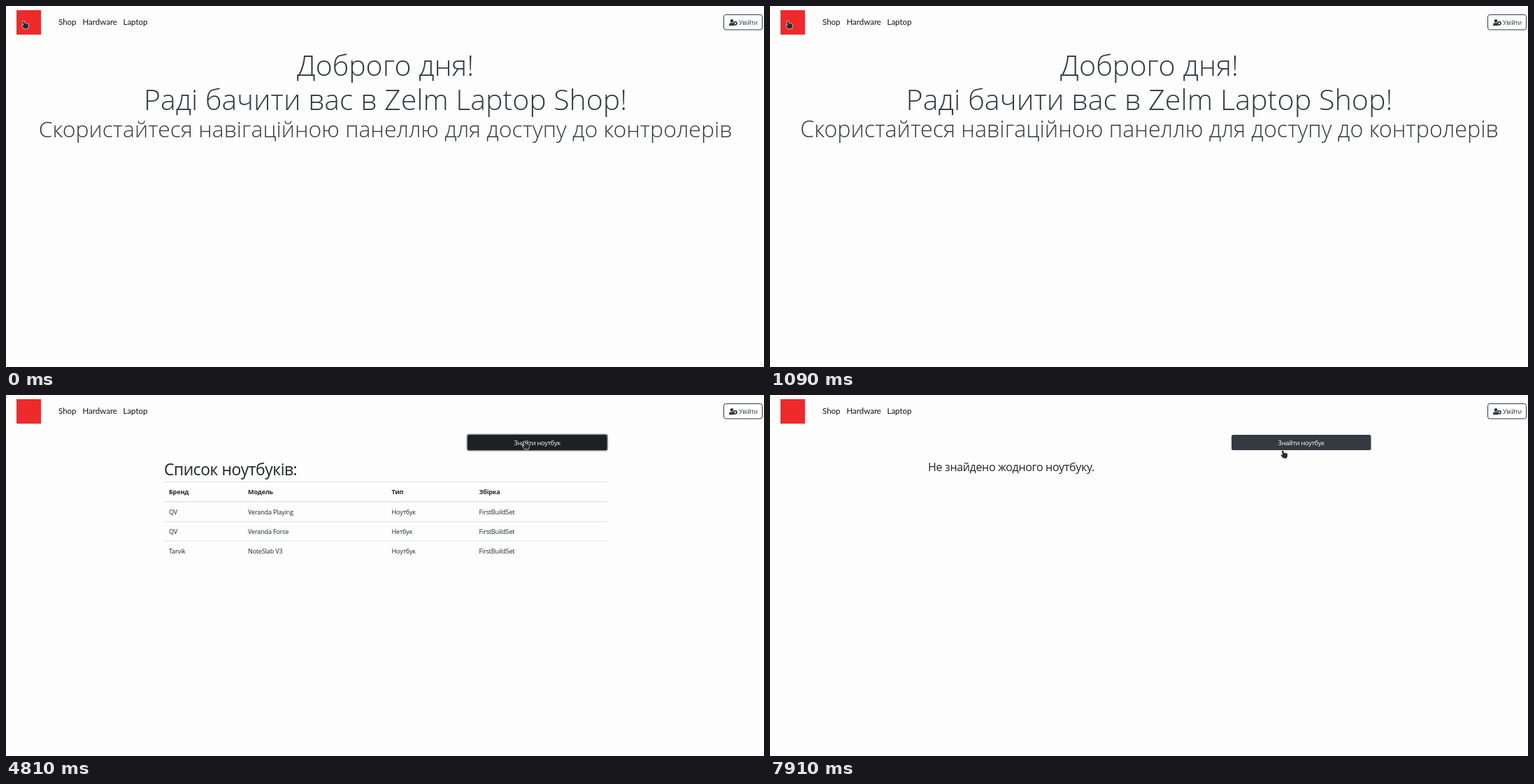
These frames come from a looping animation (1084 px wide and 517 px high, 8000 ms). An HTML page with a canvas:

```html
<!DOCTYPE html>
<html lang="uk">
<head>
<meta charset="utf-8">
<title>Laptop Shop</title>
<style>
html, body { margin: 0; width: 100%; height: 100%; overflow: hidden; background: #fdfdfd; }
canvas { display: block; width: 1084px; height: 517px; }
</style>
</head>
<body>
<canvas id="stage"></canvas>
<script>
const LOOP = 8000, W = 1084, H = 517;
const DARK = '#343a40', INK = '#212529', RULE = '#dee2e6';
const SANS = '"Open Sans", "Noto Sans", sans-serif';
const canvas = document.getElementById('stage');
const ctx = canvas.getContext('2d');
const ratio = window.devicePixelRatio || 1;
canvas.width = W * ratio;
canvas.height = H * ratio;

const clamp = v => Math.min(1, Math.max(0, v));
const ramp = (t, from, length) => clamp((t - from) / length);
const mix = (a, b, k) => a + (b - a) * k;

// Cubic Bézier timing, solved by bisection
function bezier(x1, y1, x2, y2) {
  const at = (a, b, s) => 3 * a * s * (1 - s) ** 2 + 3 * b * s * s * (1 - s) + s ** 3;
  return x => {
    let lo = 0, hi = 1;
    for (let i = 0; i < 24; i++) {
      const mid = (lo + hi) / 2;
      if (at(x1, x2, mid) < x) lo = mid; else hi = mid;
    }
    return at(y1, y2, lo);
  };
}
const ease = bezier(.25, .1, .25, 1);
const easeInOut = bezier(.42, 0, .58, 1);

function text(str, x, y, { size = 9.1, weight = 400, color = INK, align = 'left', font = SANS, gap = -.02 } = {}) {
  ctx.font = `${weight} ${size}px ${font}`;
  ctx.letterSpacing = gap * size + 'px';
  ctx.textAlign = align;
  ctx.fillStyle = color;
  ctx.fillText(str, x, y);
}

function box(x, y, w, h, r, fill, stroke) {
  ctx.beginPath();
  ctx.roundRect(x, y, w, h, r);
  if (fill) { ctx.fillStyle = fill; ctx.fill(); }
  if (stroke) { ctx.strokeStyle = stroke; ctx.lineWidth = 1; ctx.stroke(); }
}

function rule(x, y, w, h = 1, color = RULE) {
  ctx.fillStyle = color;
  ctx.fillRect(x, y, w, h);
}

function navbar() {
  box(15, 6, 35, 35, 0, '#ee2a2a');
  const link = { size: 11.5, color: '#111', font: 'Lato, sans-serif', gap: 0 };
  text('Shop', 75, 27, link);
  text('Hardware', 109.5, 27, link);
  text('Laptop', 167.5, 27, link);
  box(1026.5, 12.5, 55, 21.5, 3, null, DARK);
  userIcon(1034, 19);
  text('Увійти', 1048, 26.6, { color: DARK, size: 8.8 });
}

function userIcon(x, y) {
  ctx.fillStyle = DARK;
  ctx.beginPath();
  ctx.arc(x + 4, y + 2.4, 2.4, 0, 7);
  ctx.fill();
  box(x, y + 5.3, 7.4, 3.9, [2.4, 1, .6, .6], DARK);
  ctx.beginPath();
  ctx.arc(x + 9, y + 5.8, 2.1, 0, 7);
  ctx.lineWidth = 1.7;
  ctx.strokeStyle = DARK;
  ctx.stroke();
}

function welcome(t) {
  const up = ease(ramp(t, 308, 500)), down = ease(ramp(t, 808, 500));
  const scale = 1 + .05 * (up - down);
  const line = { weight: 300, color: DARK, align: 'center', gap: 0 };
  ctx.save();
  ctx.translate(542.5, 122);
  ctx.scale(scale, scale);
  text('Доброго дня!', 0, -22, { ...line, size: 41 });
  text('Раді бачити вас в Zelm Laptop Shop!', 0, 27, { ...line, size: 41 });
  text('Скористайтеся навігаційною панеллю для доступу до контролерів', 0, 66, { ...line, size: 32 });
  ctx.restore();
}

function table(title, x, w, cols, head, rows, dy) {
  text(title, x, 115 + dy, { size: 22.9, weight: 500 });
  rule(x, 124 + dy, w);
  rule(x, 152.3 + dy, w, 1.3);
  head.forEach((s, i) => text(s, cols[i], 142.3 + dy, { weight: 700 }));
  rows.forEach((row, r) => {
    const y = 170.8 + dy + r * 28;
    if (r) rule(x, y - 18, w);
    row.forEach((s, i) => text(s, cols[i], y));
  });
}

function button(x, y, w, label, hover = 0, ring = 0) {
  if (ring) box(x - 1.6, y - 1.6, w + 3.2, 25.2, 4, `rgba(52,58,64,${.5 * ring})`);
  const shade = [[52, 29], [58, 33], [64, 36]].map(([a, b]) => Math.round(mix(a, b, hover)));
  box(x, y, w, 22, 2.5, `rgb(${shade})`);
  text(label, x + w / 2, y + 14.5, { color: '#fff', align: 'center' });
}

function hardware() {
  button(551.5, 57, 512, 'Знайти збірку');
  table('Список збірок:', 22, 1042, [29, 136, 283, 433, 568, 778, 921.5],
    ['Назва збірки', 'Модель процесора', 'Модель відеокарти', 'Модель дисплею',
      "Модель оперативної пам'яті", 'Модель SSD диску', 'Модель HDD диску'],
    [['FirstBuildSet', 'Orlim v5-4300KD', 'VRK2040', 'QD ClearLum34', 'Orlim SwiftMEM', 'TurvoK', 'GreyOtter']], 0);
}

function form(t, height) {
  ctx.save();
  ctx.beginPath();
  ctx.rect(655, 80, 210, height);
  ctx.clip();
  const focus = ramp(t, 5680, 150);
  ['Бренд', 'Модель', 'Тип', 'Збірка'].forEach((label, i) => {
    const y = 83.5 + i * 26.3, active = i === 0 && focus > 0;
    if (active) box(657.8, y - 2, 203.9, 26, 4, `rgba(0,123,255,${.25 * focus})`);
    box(660, y, 199.5, 22, 2.5, '#fff', active ? '#80bdff' : '#ced4da');
    const typed = i === 0 && t >= 6610;
    text(typed ? (t < 6850 ? 'a' : 'aa') : label, 667, y + 15, { color: typed ? '#495057' : '#6c757d' });
  });
  button(660, 188.5, 199.5, 'Знайти');
  if (t >= 5680 && t < 6150) rule(667, 88, 1, 13, '#495057');
  ctx.restore();
}

function suggestions() {
  ctx.save();
  ctx.shadowColor = 'rgba(0,0,0,.4)';
  ctx.shadowBlur = 2;
  box(660, 106, 199.5, 132, 2, '#292a2d');
  ctx.restore();
  ['Tarvik', 'qv', 'ryy', 'gdf', 'Tar', '125215'].forEach((s, i) =>
    text(s, 667, 123.4 + i * 20.6, { size: 7, weight: 600, color: '#f1f1f1' }));
}

function laptops(t) {
  const found = t < 7120;
  const hover = ramp(t, 4640, 150) - ramp(t, 5440, 150);
  const ring = ramp(t, 4760, 50) - ramp(t, 5680, 150);
  button(660, 57, 199.5, 'Знайти ноутбук', hover, ring);
  if (!found) {
    text('Не знайдено жодного ноутбуку.', 226, 108.5, { size: 16, weight: 500 });
    return;
  }
  const open = 131.5 * ease(ramp(t, 4830, 350));
  table('Список ноутбуків:', 226, 634, [233, 346, 551.5, 676.5],
    ['Бренд', 'Модель', 'Тип', 'Збірка'],
    [['QV', 'Veranda Playing', 'Ноутбук', 'FirstBuildSet'],
      ['QV', 'Veranda Force', 'Нетбук', 'FirstBuildSet'],
      ['Tarvik', 'NoteSlab V3', 'Ноутбук', 'FirstBuildSet']], open);
  if (open) form(t, open);
  if (t >= 5760 && t < 6610) suggestions();
}

const HAND = new Path2D('M2 1.3Q3 -.1 4.1 1L5 4.1L8.8 4.6Q10.2 5 10.1 6.5L9.7 9.5L8.8 11.5H4.2L.8 7.9Q.3 6.5 1.7 6.5L3.1 7.4Z');
const ARROW = new Path2D('M0 0V10L2.5 7.8L4.2 11.4L5.8 10.7L4.2 7.2H7.4Z');
// Pointer tip: time, x, y
const PATH = [
  [0, 25, 21], [1140, 25, 21], [1740, 85, 22], [1910, 85, 22], [1950, 84, 23], [2480, 84, 23],
  [2860, 118, 20], [3490, 118, 20], [3640, 178, 20], [3780, 178, 20], [3800, 177, 20],
  [4070, 177, 20], [4790, 741, 66], [5260, 741, 66], [5630, 718, 99], [5690, 718, 99],
  [5880, 718, 105], [7780, 718, 105], [7910, 733, 79], [LOOP, 733, 79]
];

function cursor(t) {
  if (t >= 6610 && t < 7470) return;
  const i = PATH.findIndex(p => p[0] > t);
  const [t0, x0, y0] = PATH[i - 1], [t1, x1, y1] = PATH[i];
  const k = easeInOut((t - t0) / (t1 - t0));
  const x = mix(x0, x1, k), y = mix(y0, y1, k);
  const onNav = y < 36 && (x < 62 || (x > 74 && x < 203));
  const onButton = x > 660 && y > 56 && y < 80;
  const hand = onNav || onButton;
  const shape = hand ? HAND : ARROW;
  ctx.save();
  ctx.translate(hand ? x - 3 : x, y);
  ctx.lineJoin = 'round';
  ctx.lineWidth = 1.3;
  ctx.strokeStyle = '#e8e8e8';
  ctx.stroke(shape);
  ctx.fillStyle = '#2b2b2b';
  ctx.fill(shape);
  ctx.restore();
}

function draw(t) {
  ctx.setTransform(ratio, 0, 0, ratio, 0, 0);
  ctx.fillStyle = '#fdfdfd';
  ctx.fillRect(0, 0, W, H);
  navbar();
  if (t < 2180) welcome(t);
  else if (t >= 3340 && t < 4020) hardware();
  else if (t >= 4020) laptops(t);
  cursor(t);
}

const start = performance.now();
function tick() {
  draw((performance.now() - start) % LOOP);
  requestAnimationFrame(tick);
}
tick();
</script>
</body>
</html>
```
